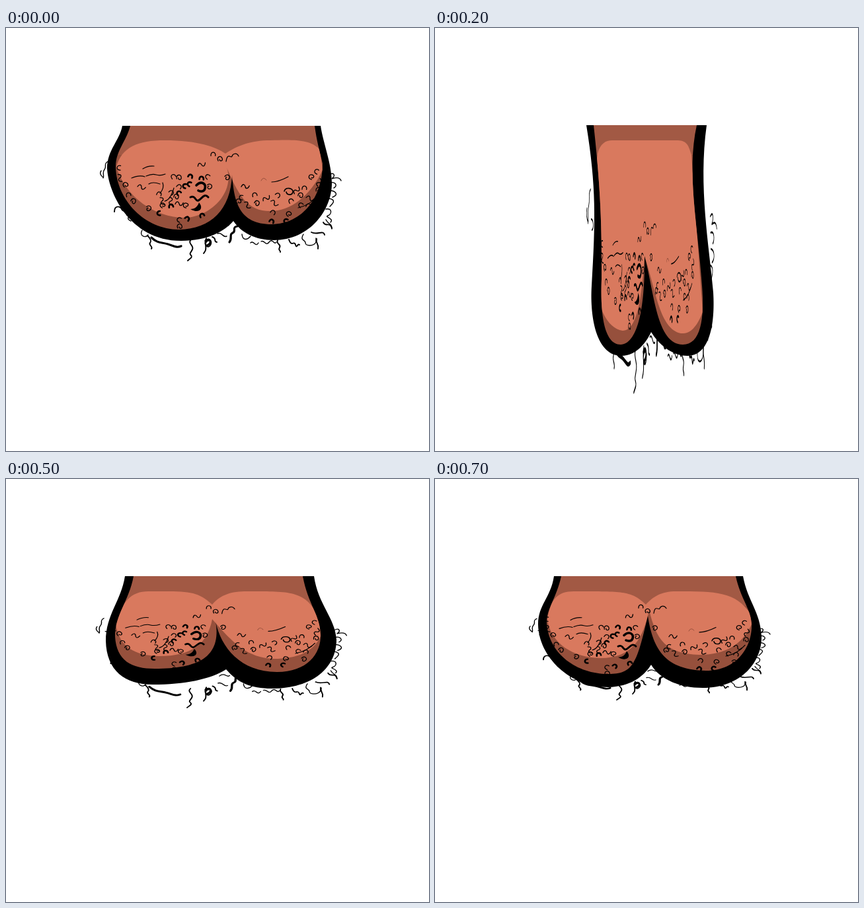
Recreate the animation shown at these times as an HTML page. Size 640x640 px, loop 800 ms.

```html
<!DOCTYPE html>
<html lang="en">
<head>
<meta charset="utf-8">
<title>Bounce</title>
<style>
html, body { margin: 0; width: 100%; height: 100%; overflow: hidden; background: #fff; }
svg { display: block; width: 100%; height: 100%; }
.pose { opacity: 0; animation: show 800ms step-end infinite; }
.hair { fill: none; stroke: #000; stroke-linecap: round; stroke-linejoin: round; }
@keyframes show {
  0% { opacity: 1; }
  12.5%, 100% { opacity: 0; }
}
</style>
</head>
<body>
<svg id="stage" viewBox="0 0 640 640">
  <defs>
    <linearGradient id="shade" gradientUnits="userSpaceOnUse" x1="0" y1="0" x2="0" y2="640">
      <stop offset=".3" stop-color="#a25944"/>
      <stop offset=".3" stop-color="#96503c"/>
    </linearGradient>
  </defs>
</svg>
<script>
// Each pose: outline, skin, lit area, then "scaleX shiftX scaleY shiftY" for inner and outer hair
const rest = [
  'M176,148C172,170 153,185 153,212C154,245 185,322 265,322C305,322 330,308 344,292C356,310 378,321 405,321C460,321 493,275 493,235C493,205 480,175 476,148Z',
  'M188,148C182,172 166,185 166,210C167,260 210,305 262,305C310,304 340,275 342,222C345,262 352,297 402,297C450,296 479,255 479,205C474,185 470,170 467,148Z',
  'M167,210C175,180 200,170 240,170C290,170 318,180 332,190C350,178 370,170 400,170C435,169 460,168 475,184L479,215C460,255 430,277 400,277C365,277 352,255 331,204C352,245 310,287 270,287C225,287 180,255 167,210Z',
  '1 0 1 0', '1 0 1 0'
];
const wide = [
  'M91,147C86,160 77,168 77,183C78,215 140,238 215,238C275,238 320,234 342,219C365,240 400,251 445,251C520,251 565,215 565,182C564,168 557,160 557,147Z',
  'M104,147C98,160 91,168 91,180C92,205 150,220 220,220C290,220 335,205 344,165C350,200 375,227 450,228C510,228 551,205 551,180C551,168 545,158 541,147Z',
  'M91,182C95,172 100,169 120,169C240,169 334,168 340,169C350,168 370,169 380,169C520,169 535,168 550,182L551,186C535,208 500,212 460,212C395,212 360,195 343,168C330,200 280,211 225,211C160,210 110,195 91,182Z',
  '1.444 -150 .66 28.3', '1.457 -153.6 .68 31.8'
];
const tall = [
  'M229,147C244,240 243,290 237,390C234,440 245,496 282,496C305,496 320,475 327,460C338,478 358,496 382,496C415,496 424,450 421,400C415,330 398,240 411,147Z',
  'M240,147C248,220 253,280 252,380C250,430 255,479 281,479C305,478 318,430 317,345C332,400 335,479 375,479C402,479 408,440 404,390C398,300 380,220 396,147Z',
  'M246,190C250,175 258,170 268,170C290,170 300,170 317,170C330,170 345,170 365,170C380,170 383,175 388,192L405,430C395,455 385,463 372,462C340,455 335,400 317,345C313,400 308,458 284,458C230,450 230,300 246,190Z',
  '.454 175 1.41 28.3', '.541 152 2.05 -170'
];
const wide2 = [
  'M130,147C126,160 124,175 124,190C126,240 190,291 262,291C300,291 330,283 347,267C365,283 395,293 430,293C485,293 527,255 527,215C526,190 515,168 506,147Z',
  'M143,147C139,160 137,178 139,195C144,235 195,272 260,272C310,272 338,262 333,198C345,235 360,267 425,268C480,268 512,235 511,200C510,180 500,165 491,147Z',
  'M138,195C142,175 148,170 165,170C300,170 310,166 330,184C339,172 350,170 370,170C480,170 496,168 511,198L511,203C490,235 450,250 420,250C375,250 362,230 331,172C330,225 300,252 245,252C200,252 155,225 138,195Z',
  '1.185 -60 .89 12.1', '1.2 -60 .82 30.6'
];
const wide3 = [
  'M180,147C174,185 151,205 151,245C152,290 180,311 222,311C270,311 310,303 333,288C350,308 370,317 402,317C465,317 500,285 500,243C498,210 472,190 466,147Z',
  'M193,147C186,185 165,205 165,238C167,275 190,287 225,287C290,287 327,270 317,215C325,255 355,292 410,292C455,292 477,265 476,235C475,205 457,190 449,147Z',
  'M166,220C175,185 190,170 215,170C275,170 288,168 312,190C325,175 340,170 365,170C430,170 455,168 474,212L476,238C465,262 440,272 405,272C365,270 345,250 312,212C305,250 280,268 232,268C195,267 172,255 166,220Z',
  '1.02 -13 .86 30', '1.04 -12 .9 29'
];
const settle = [
  'M180,147C175,180 156,190 156,220C157,270 205,315 262,315C295,314 315,300 327,281C340,303 370,316 405,316C465,316 495,275 494,238C492,200 473,185 466,147Z',
  'M191,147C184,180 169,195 169,218C172,265 215,295 262,295C300,295 305,280 322,207C330,260 350,289 410,290C460,290 481,250 479,218C477,195 462,180 455,147Z',
  'M170,212C175,182 185,170 210,170C285,170 297,169 319,190C330,178 342,170 365,170C425,170 455,170 478,205L479,220C465,250 440,266 400,266C350,264 335,245 324,198C315,240 300,271 250,271C210,270 175,250 170,212Z',
  '1 -2 .925 16.4', '1 0 .82 45.6'
];

const num = /-?\d*\.?\d+/g;
const mix = (a, b, k) => a.map((s, i) => {
  const to = b[i].match(num);
  let n = 0;
  return s.replace(num, v => +(+v + (to[n++] - v) * k).toFixed(3));
});

const poses = [rest, wide, tall, wide2, mix(rest, tall, .4), wide3, mix(settle, tall, .1), settle];

// Repeated curls: shape and where it sits
const curls = [
  ['m-3,3c-4,-7 5,-9 6,-3', 1.3,
   '172,211 186,253 250,250 254,225 262,241 306,225 232,252 263,290 314,192 357,256 377,253 411,254 432,262 404,280 447,268 458,270 471,217 452,243'],
  ['m-3,3c-3,-6 4,-9 6,-4s-4,5 -4,2', 1.3,
   '181,237 193,262 237,268 258,255 272,268 262,226 308,240 324,198 335,226 352,262 380,265 428,281 446,253 462,225 473,245 216,273 263,300 455,282'],
  ['m-6,1c2,-6 5,-4 6,-1s4,4 6,-2', 1.3,
   '205,241 249,262 262,266 236,262 296,207 365,268 394,258 406,265 440,246 460,258 474,234 362,240 172,227'],
  ['m-2,3c-4,-5 2,-8 5,-4', 2.6,
   '279,225 278,236 296,228 271,239 250,270 232,280 297,284 274,289 262,250 402,293 424,292']
];
const strays = [
  ['M207,213q8,-5 17,-4M212,224q9,-4 15,-2t14,-1M190,227q12,-5 20,-2M216,236q6,-4 17,0M233,250q7,-8 4,-16M402,233q10,0 25,-8M333,202c2,-15 8,-4 9,-8s7,-6 10,0M442,272q18,-4 29,-18M240,262q9,-2 14,-20', 1.2],
  ['M421,247c2,-7 14,-5 13,1s-9,5 -10,0', 1.6],
  ['M288,238c8,-8 15,-2 13,5s-10,3 -10,3', 3.6],
  ['M279,256c8,-4 7,7 12,5s9,-12 15,-5', 3]
];
const fringe = [
  ['M154,202c-7,4 -1,7 -5,12s0,9 -2,13M144,216c-3,4 0,8 3,10M156,224c6,0 8,7 2,8M193,284c-9,-2 -11,6 -4,8M489,222c8,-5 9,2 5,5s10,-5 13,4M490,234c9,-2 12,5 6,8M491,246c9,1 12,7 3,10M489,258c12,2 4,9 1,12M484,274c10,-2 9,8 3,10s10,4 4,10M450,312c-6,10 3,8 3,13s12,6 16,-1l0,-6M370,325c5,-5 7,8 12,0M386,323c5,-3 7,8 12,1s8,5 11,0M320,311c7,-3 8,7 14,4M322,299c8,-7 12,4 15,-1M206,306c-5,8 5,13 9,7M357,312c1,10 8,9 13,3M484,290c4,8 9,5 9,14', 1.4],
  ['M164,278c0,-11 10,-8 11,-4s7,2 8,9M214,314c4,4 7,8 4,11s5,6 2,9M280,320c-6,6 5,9 2,15s-5,6 -2,9s-2,5 -5,8M303,318c-5,12 4,17 7,9s-9,-7 -8,1s0,9 -3,13M312,316c8,3 1,7 7,8M411,321c-3,6 6,6 3,11s2,4 1,7M428,320c4,12 8,1 10,8s3,-3 6,0M462,309c9,5 18,-4 20,4M470,319c-2,8 4,7 2,15M480,294c4,8 10,-2 13,9', 1.9],
  ['M220,317c9,9 15,7 25,10s13,6 20,3M350,300c-9,1 -1,8 -7,10s0,8 -5,14M302,322c7,-6 11,4 2,7', 3.2]
];

const line = ([d, w]) => `<path d="${d}" stroke-width="${w}"/>`;
const scatter = ([d, w, spots], k) => spots.split(' ').map((p, i) =>
  `<path d="M0,0${d}" stroke-width="${w}" transform="translate(${p}) rotate(${(i * 67 + k * 40) % 150 - 60})"/>`).join('');
const place = t => {
  const [sx, x, sy, y] = t.split(' ');
  return `class="hair" transform="matrix(${sx} 0 0 ${sy} ${x} ${y})"`;
};

const inner = curls.map(scatter).join('') + strays.map(line).join('') +
  '<path d="M279,274c7,0 11,-4 13,-10c8,9 0,18 -13,10Z" fill="#000" stroke="none"/>' +
  '<path d="M386,231q3,-7 8,-1" stroke="#96503c" stroke-width="1"/>';
const outer = fringe.map(line).join('');

const draw = ([outline, skin, lit, inT, outT], i) => `
  <g class="pose" style="animation-delay:${(i - 8) * 100}ms">
    <clipPath id="skin${i}"><path d="${skin}"/></clipPath>
    <g ${place(outT)}>${outer}</g>
    <path d="${outline}"/>
    <path d="${skin}" fill="url(#shade)"/>
    <path d="${lit}" fill="#d9795e" clip-path="url(#skin${i})"/>
    <g ${place(inT)}>${inner}</g>
  </g>`;

document.getElementById('stage').insertAdjacentHTML('beforeend', poses.map(draw).join(''));
</script>
</body>
</html>
```
